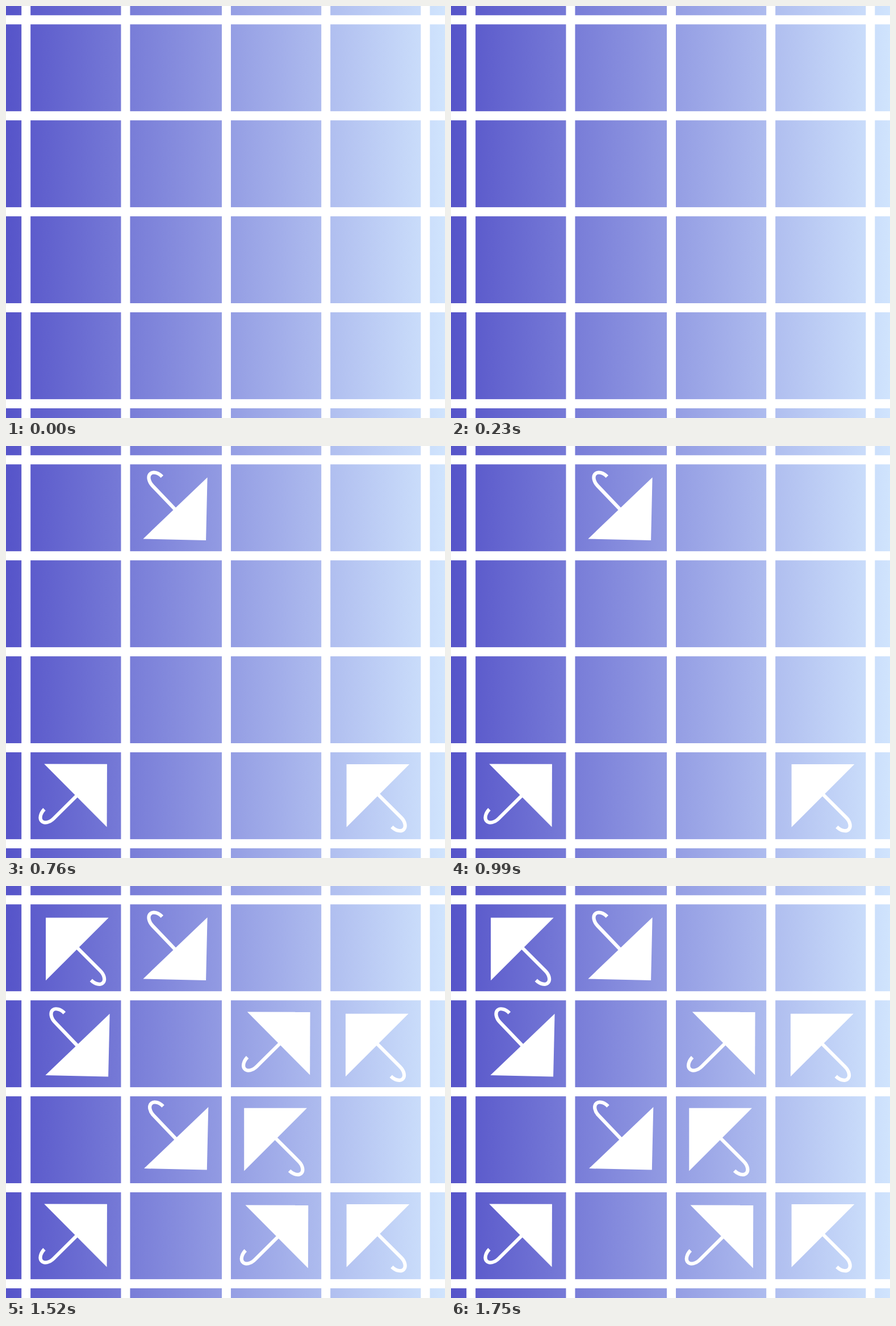
An HTML page that plays this animation: 773 px wide and 725 px high, repeating every 1.9 s.

```html
<!DOCTYPE html>
<html lang="en">
<head>
<meta charset="utf-8">
<title>Umbrellas</title>
<style>
  html, body { margin: 0; width: 100%; height: 100%; overflow: hidden; background: #fff; }
  svg { display: block; width: 100vw; height: 100vh; }
</style>
</head>
<body>
<svg viewBox="0 0 773 725">
  <defs>
    <linearGradient id="sky" gradientUnits="userSpaceOnUse" x1="0" y1="0" x2="773" y2="0">
      <stop offset="0" stop-color="#5654c9"/>
      <stop offset="1" stop-color="#d0e4fd"/>
    </linearGradient>
    <g id="umbrella">
      <path d="M-78.3 0H78.3L0 -78.3Z" fill="#fff"/>
      <path d="M1.7 -3V56A11.6 18 0 0 1 -21.5 56" fill="none" stroke="#fff" stroke-width="6.2"/>
    </g>
  </defs>
  <rect width="773" height="725" fill="url(#sky)"/>
  <g id="bars" fill="#fff"></g>
  <g id="umbrellas"></g>
</svg>
<script>
const STEP = 380, BAR = 16;
const NE = 45.2, NW = -45, SE = 136.3;

// Umbrellas that join at each step: heading and middle of the canopy edge.
const arrivals = [
  [],
  [[NE, 122.4, 615]],
  [[SE, 298, 109.3], [NW, 655, 615.4]],
  [[SE, 126, 278.9], [NW, 653.3, 280], [NW, 474.6, 446.2]],
  [[NW, 125.4, 111], [NE, 480, 277], [SE, 299.7, 443], [NE, 476.7, 617]]
];

function add(parent, tag, attributes) {
  const node = document.createElementNS("http://www.w3.org/2000/svg", tag);
  for (const [name, value] of Object.entries(attributes)) node.setAttribute(name, value);
  return parent.appendChild(node);
}

const bars = document.getElementById("bars");
for (const x of [27.2, 202.5, 380, 555.2, 730.4]) {
  add(bars, "rect", { x, y: 0, width: BAR, height: 725 });
}
for (let y = 16.3; y < 725; y += 168.9) {
  add(bars, "rect", { x: 0, y, width: 773, height: BAR });
}

const groups = arrivals.map(places => {
  const group = add(document.getElementById("umbrellas"), "g", {});
  for (const [heading, x, y] of places) {
    add(group, "use", {
      href: "#umbrella",
      transform: `translate(${x} ${y}) rotate(${heading})`
    });
  }
  return group;
});

const start = performance.now();

function draw(now) {
  const step = Math.floor(Math.max(0, now - start) / STEP) % groups.length;
  groups.forEach((group, i) => {
    group.setAttribute("visibility", i <= step ? "visible" : "hidden");
  });
  requestAnimationFrame(draw);
}
draw(start);
</script>
</body>
</html>
```
